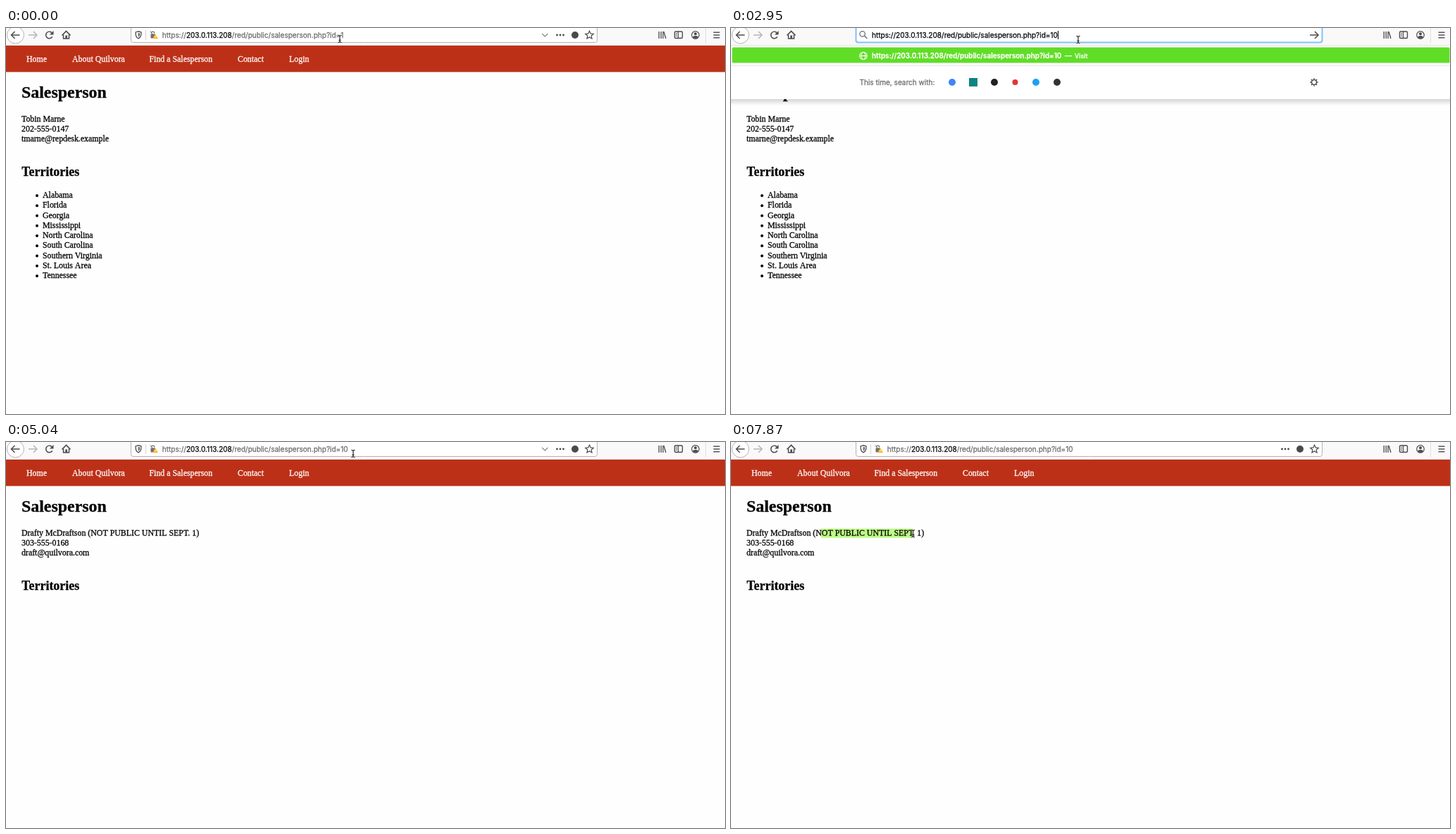
Recreate the animation shown at these times as an HTML page with a canvas. Size 1021x548 px, loop 8 s.

```html
<!DOCTYPE html>
<html lang="en">
<head>
<meta charset="utf-8">
<title>Salesperson</title>
<style>
  html, body { margin: 0; width: 100%; height: 100%; overflow: hidden; background: #fff; }
  canvas { display: block; }
</style>
</head>
<body>
<canvas id="stage" width="1021" height="548"></canvas>
<script>
const ctx = document.getElementById('stage').getContext('2d');
const LOOP = 8000;
const SERIF = '"Liberation Serif", serif';
const SANS = 'Inter, sans-serif';
const URL_FONT = '10.05px ' + SANS;
const INK = '#0c0c0d', ICON = '#4a4a4c', DIM = '#6f6f70', PICK = '#bdfd84';

const HOST = '203.0.113.208';
const PATH = '/red/public/salesperson.php?id=';
const PEOPLE = {
  first: ['Tobin Marne', '202-555-0147', 'tmarne@repdesk.example'],
  second: ['Drafty McDraftson (NOT PUBLIC UNTIL SEPT. 1)', '303-555-0168', 'draft@quilvora.com']
};
const STATES = ['Alabama', 'Florida', 'Georgia', 'Mississippi', 'North Carolina',
  'South Carolina', 'Southern Virginia', 'St. Louis Area', 'Tennessee'];
const NAV = [['Home', 29], ['About Quilvora', 94], ['Find a Salesperson', 203.5],
  ['Contact', 329], ['Login', 402]];

const FOCUS = 740, DESELECT = 1170, TYPED = 2950, ENTER = 4440, LOADED = 4740, SETTLED = 5040;

// time, x, y, shape
const POINTER = [
  [0, 474, 15.5, 'beam'], [150, 480, 18, 'beam'], [300, 486, 24, 'arrow'], [440, 491, 15, 'beam'],
  [590, 494, 11, 'beam'], [740, 493.5, 10.5, 'beam'], [1170, 493, 14, 'beam'], [1320, 491.5, 15, 'beam'],
  [1620, 491.5, 16, 'beam'], [2060, 493, 16, 'beam'], [2210, 492, 16.5, 'beam'], [2950, 493, 16.5, 'beam'],
  [6080, 140.5, 26, 'arrow'], [6230, 138, 56, 'arrow'], [6380, 135, 88, 'arrow'], [6530, 133, 107, 'arrow'],
  [6680, 132, 124, 'beam'], [6820, 131.5, 129, 'beam'], [6970, 131.5, 132, 'beam'], [7120, 131.5, 134, 'beam'],
  [7270, 255, 121, 'beam'], [7420, 257, 130, 'beam'], [7720, 261, 121, 'beam'], [7870, 258.5, 130, 'beam']
];
const CARET = [[0, 0], [1170, 1], [1620, 0], [2060, 1], [2650, 0], [2950, 1], [3250, 0], [3850, 1], [4440, 0]];
// highlighted span on the name line
const DRAG = [[0, 0, 0], [7270, 22, 128], [7420, 128, 257], [7720, 22, 128], [7870, 128, 259]];

const at = (keys, t) => keys.filter(k => k[0] <= t).pop();

// a hairline outline gives the text its slightly heavy weight
function text(s, x, y, font, color) {
  ctx.font = font;
  ctx.fillStyle = ctx.strokeStyle = color;
  ctx.lineWidth = 0.28;
  ctx.lineJoin = 'round';
  ctx.fillText(s, x, y);
  ctx.strokeText(s, x, y);
  ctx.lineJoin = 'miter';
  return x + ctx.measureText(s).width;
}
function box(x, y, w, h, color) {
  ctx.fillStyle = color;
  ctx.fillRect(x, y, w, h);
}
function trace(points, close) {
  ctx.beginPath();
  points.forEach(p => ctx.lineTo(p[0], p[1]));
  if (close) ctx.closePath();
}
function stroke(color, width = 1.4) {
  ctx.strokeStyle = color;
  ctx.lineWidth = width;
  ctx.stroke();
}
function line(points, color, width) {
  trace(points);
  stroke(color, width);
}
function shape(points, color) {
  trace(points, true);
  ctx.fillStyle = color;
  ctx.fill();
}
function arc(x, y, r, color, width, from = 0, to = Math.PI * 2) {
  ctx.beginPath();
  ctx.arc(x, y, r, from, to);
  stroke(color, width);
}
function dot(x, y, r, color) {
  ctx.beginPath();
  ctx.arc(x, y, r, 0, Math.PI * 2);
  ctx.fillStyle = color;
  ctx.fill();
}
function arrow(x, y, dir, color) {
  line([[x - 6 * dir, y], [x + 5.5 * dir, y]], color, 1.5);
  line([[x + dir, y - 5], [x + 6 * dir, y], [x + dir, y + 5]], color, 1.5);
}

function drawPage(t) {
  box(0, 0, 1021, 548, '#fefefe');
  box(0, 25, 1021, 37.5, '#bd3018');
  const body = '11.88px ' + SERIF;
  NAV.forEach(([label, x]) => text(label, x, 48, body, '#fff'));
  text('Salesperson', 22, 99, 'bold 23.9px ' + SERIF, '#000');
  text('Territories', 22.3, 209.5, 'bold 17.9px ' + SERIF, '#000');

  const [, from, to] = at(DRAG, t);
  box(from, 123, to - from, 13, PICK);

  const isNew = t >= LOADED;
  PEOPLE[isNew ? 'second' : 'first'].forEach((s, i) => text(s, 22, 133 + i * 14.2, body, '#000'));
  if (isNew) return;
  STATES.forEach((s, i) => {
    const y = 241 + i * 14.25;
    dot(44, y - 3, 2, '#000');
    text(s, 52, y, body, '#000');
  });
}

function drawToolbar(t) {
  box(0, 0, 1021, 25, '#f9f9fa');
  box(0, 24, 1021, 1, '#e4e4e5');

  dot(13.5, 10, 12, '#fff');
  arc(13.5, 10, 12, '#b4b4b5', 1);
  arrow(13.5, 10, -1, ICON);
  arrow(38, 10, 1, '#b6b6b8');

  if (t >= ENTER && t < SETTLED) {
    const turn = Math.floor((t - ENTER) / 148) * 0.7;
    arc(62, 10, 5, ICON, 1.5, Math.PI * 0.8 + turn, Math.PI * 2.2 + turn);
  } else {
    arc(61.5, 10, 4.8, ICON, 1.6, 0.5, Math.PI * 1.75);
    shape([[67.5, 4], [67.5, 9.5], [62, 9.5]], ICON);
  }

  line([[79.5, 10.5], [85.5, 4.5], [91.5, 10.5]], ICON, 1.6);
  line([[81.5, 9.5], [81.5, 15], [89.5, 15], [89.5, 9.5]], ICON, 1.5);
  box(84.3, 10.5, 2.6, 4.5, ICON);

  [927.2, 930.2, 933].forEach(x => line([[x, 5], [x, 15]], ICON, 1.3));
  line([[934, 5], [937, 15]], ICON, 1.3);
  ctx.beginPath();
  ctx.roundRect(949.5, 5, 11, 9.5, 1.5);
  stroke(ICON, 1.4);
  line([[954.5, 5], [954.5, 14.5]], ICON, 1.2);
  [7.5, 9.5, 11.5].forEach(y => line([[951, y], [953, y]], ICON, 0.8));
  arc(979, 10, 5.3, ICON, 1.2);
  dot(979, 8.3, 2, ICON);
  ctx.beginPath();
  ctx.ellipse(979, 12.8, 3.5, 1.9, 0, 0, Math.PI * 2);
  ctx.fill();
  box(993, 0, 1, 21, '#dededf');
  [6.2, 10, 13.8].forEach(y => line([[1004.5, y], [1013.5, y]], ICON, 1.4));
}

function drawSiteIcons() {
  const shield = [[184, 6], [188, 4.8], [192, 6], [191.6, 10.5], [190.5, 13], [188, 15], [185.5, 13], [184.4, 10.5]];
  trace(shield, true);
  stroke(ICON, 1.3);
  shape([[188, 7], [190, 7.5], [189.6, 11], [188, 13]], ICON);
  box(198, 3, 1, 14, '#d2d2d3');

  arc(208.5, 7.5, 2.3, DIM, 1.3, Math.PI, Math.PI * 2);
  box(205.5, 8.5, 6.5, 6, DIM);
  line([[205, 4.5], [212, 14]], DIM, 1);
  shape([[212, 8.5], [216, 15.3], [208, 15.3]], '#ffb81c');
  box(211.6, 11, 0.9, 2.4, '#fff');
}

function drawPageActions(t, focused) {
  ctx.globalAlpha = t >= 6380 ? 0 : t >= 6230 ? 0.5 : 1;
  line([[761.2, 8], [765.3, 12], [769.4, 8]], focused ? ICON : '#909092', 1.4);
  ctx.globalAlpha = 1;
  [782.5, 787, 791.5].forEach(x => dot(x, 10, 1.4, ICON));
  dot(808, 10, 5, ICON);
  const star = Array.from({ length: 10 }, (_, i) => {
    const a = i * Math.PI / 5 - Math.PI / 2, r = i % 2 ? 2.8 : 6;
    return [828.5 + r * Math.cos(a), 10.2 + r * Math.sin(a)];
  });
  trace(star, true);
  stroke(ICON, 1.2);
}

function drawAddress(t) {
  const focused = t >= FOCUS && t < ENTER;
  const searching = t >= TYPED && t < LOADED;
  const id = t >= TYPED ? '10' : '1';

  ctx.beginPath();
  ctx.roundRect(177.5, -6, 662, 26.5, 3);
  ctx.fillStyle = '#fff';
  ctx.fill();
  if (focused) stroke('#84bff7', 2);
  else stroke('#b3b3b5', 1);

  if (searching) {
    arc(186.6, 8.4, 3.7, DIM, 1.3);
    line([[189.3, 11], [193.3, 15]], DIM, 1.6);
    if (focused) arrow(828, 10, 1, ICON);
  } else {
    drawSiteIcons();
    drawPageActions(t, focused);
  }

  const left = searching ? 200 : 221.8;
  const shade = focused ? INK : DIM;
  if (t >= FOCUS && t < DESELECT) {
    ctx.font = URL_FONT;
    box(left, 4, ctx.measureText('https://' + HOST + PATH + id).width, 12.5, PICK);
  }
  let x = text('https://', left, 14, URL_FONT, shade);
  x = text(HOST, x, 14, URL_FONT, INK);
  x = text(PATH + id, x, 14, URL_FONT, shade);
  if (at(CARET, t)[1]) box(Math.round(x), 4, 1, 12, '#000');
}

function drawDropdown() {
  const shadow = ctx.createLinearGradient(0, 101, 0, 110);
  shadow.addColorStop(0, 'rgba(0,0,0,.16)');
  shadow.addColorStop(1, 'rgba(0,0,0,0)');
  box(0, 101, 1021, 9, shadow);
  box(0, 25, 1021, 76, '#fff');
  ctx.beginPath();
  ctx.roundRect(1.5, 27.5, 1019, 22, 1.5);
  ctx.fillStyle = '#60dd26';
  ctx.fill();
  box(0, 53, 1021, 1, '#e9e9ea');

  arc(188, 39.5, 5.2, '#fff', 1.2);
  ctx.beginPath();
  ctx.ellipse(188, 39.5, 2.4, 5.2, 0, 0, Math.PI * 2);
  stroke('#fff', 1);
  line([[183, 39.5], [193, 39.5]], '#fff', 1);

  text('https://' + HOST + PATH + '10', 200, 43.3, '600 9.9px ' + SANS, '#fff');
  text('—', 474, 43.3, '10px ' + SANS, '#fff');
  text('Visit', 488, 43.3, '500 8.8px ' + SANS, '#fff');

  text('This time, search with:', 182.5, 81.3, URL_FONT, DIM);
  dot(314, 77, 5, '#4285f4');
  box(338, 71, 12, 12, '#0c8484');
  dot(374, 77, 5, '#222');
  dot(403.5, 77, 4, '#e53238');
  dot(433, 77, 5, '#1da1f2');
  dot(463, 77, 5, '#333');

  arc(828, 77, 3.4, ICON, 1.4);
  for (let i = 0; i < 8; i++) {
    const c = Math.cos(i * Math.PI / 4), s = Math.sin(i * Math.PI / 4);
    line([[828 + 3.8 * c, 77 + 3.8 * s], [828 + 5.8 * c, 77 + 5.8 * s]], ICON, 1.4);
  }
}

function drawPointer(t) {
  const [, x, y, kind] = at(POINTER, t);
  if (kind === 'arrow') {
    trace([[0, 0], [0, 10.5], [2.5, 8.3], [4.2, 12], [6, 11.2], [4.4, 7.6], [7.6, 7.4]]
      .map(([dx, dy]) => [x + dx, y + dy]), true);
    stroke('#fff', 1.8);
    ctx.fillStyle = '#000';
    ctx.fill();
    return;
  }
  for (const [color, width] of [['rgba(255,255,255,.8)', 2.4], ['#111', 1.1]]) {
    line([[x, y - 4.5], [x, y + 4.5]], color, width);
    line([[x - 2.5, y - 5.3], [x, y - 4.3], [x + 2.5, y - 5.3]], color, width);
    line([[x - 2.5, y + 5.3], [x, y + 4.3], [x + 2.5, y + 5.3]], color, width);
    line([[x - 1.5, y + 1.8], [x + 1.5, y + 1.8]], color, width);
  }
}

function render(now) {
  const t = now % LOOP;
  drawPage(t);
  drawToolbar(t);
  if (t >= TYPED && t < ENTER) drawDropdown();
  drawAddress(t);
  drawPointer(t);
}

const start = performance.now();
function tick() {
  render(performance.now() - start);
  requestAnimationFrame(tick);
}
tick();
</script>
</body>
</html>
```
